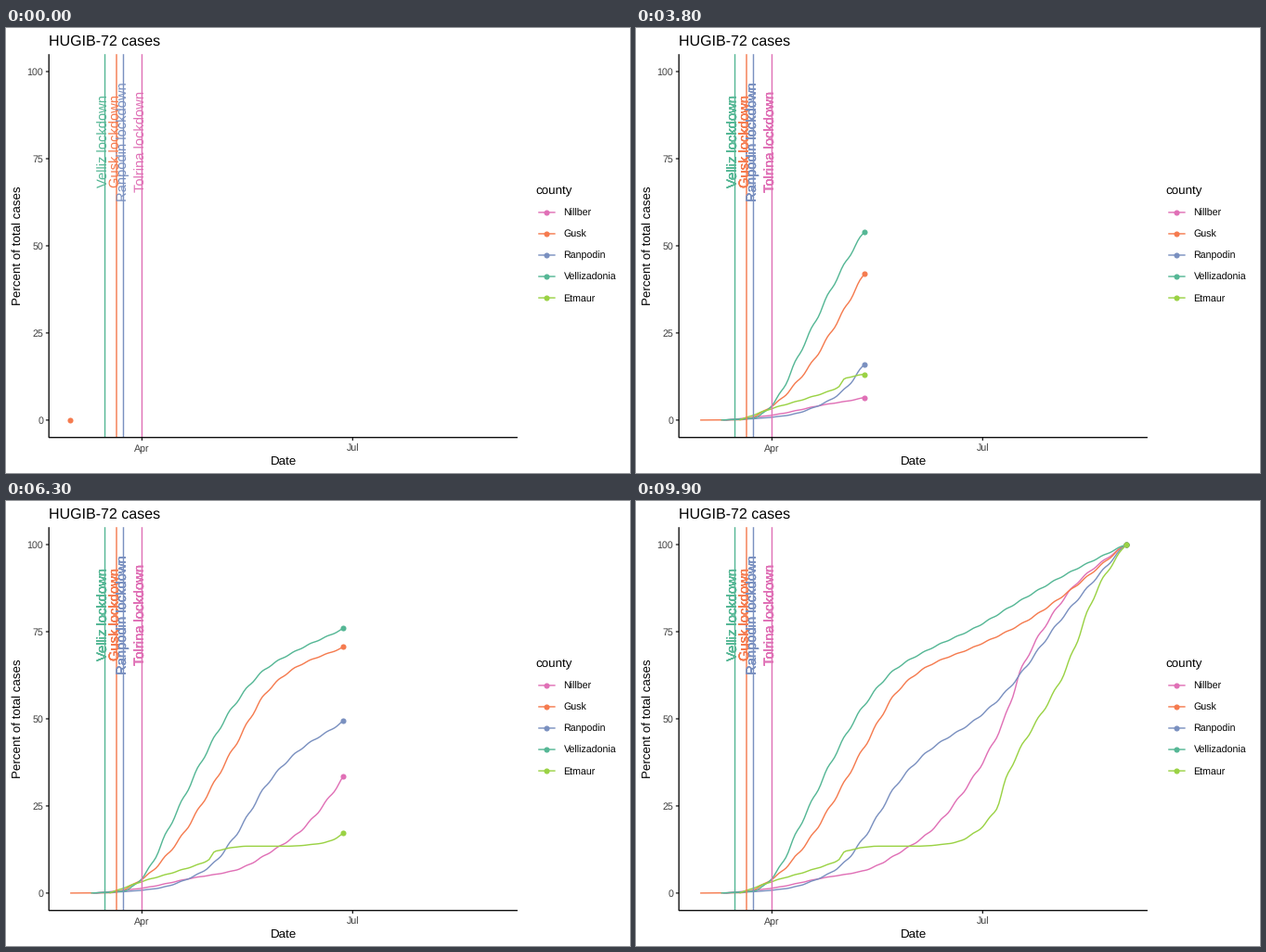
Recreate the animation shown at these times as a matplotlib script. Size 672 by 480 pixels, loop 10000 ms.

```python
import numpy as np
import matplotlib.pyplot as plt
from matplotlib.animation import FuncAnimation

plt.rcParams.update({
    "font.family": "Liberation Sans",
    "path.snap": False,
    "text.hinting": "none",
    "lines.solid_capstyle": "butt",
    "lines.solid_joinstyle": "round",
})

W, H, DPI = 672, 480, 96
FRAMES, DAYS = 100, 184
LEFT, RIGHT, TOP, BOTTOM = 46.2, 550.9, 28.2, 441.7
PX = 72 / DPI  # points per pixel
PAD = 0.05     # axis expansion on each side

PINK, ORANGE, BLUE = "#E070B6", "#F57B4F", "#7A90C0"
GREEN, LIME = "#55B795", "#9AD244"
TICK, GREY = "#242424", "#404040"


def sx(day):
    return LEFT + (RIGHT - LEFT) * (PAD + day / DAYS) / (1 + 2 * PAD)


def sy(pct):
    return BOTTOM - (BOTTOM - TOP) * (PAD + pct / 100) / (1 + 2 * PAD)


def monotone(t, keys):
    """Smooth curve through rising key points, without overshoot."""
    x, y = np.array(keys, float).T
    h = np.diff(x)
    d = np.diff(y) / h
    inner = 2 * d[:-1] * d[1:] / (d[:-1] + d[1:] + 1e-9)
    m = np.concatenate([d[:1], inner, d[-1:]])
    k = np.clip(np.searchsorted(x, t, side="right") - 1, 0, len(h) - 1)
    u = np.clip((t - x[k]) / h[k], 0, 1)
    return (y[k] + (y[k + 1] - y[k]) * u * u * (3 - 2 * u)
            + h[k] * u * (1 - u) * (m[k] * (1 - u) - m[k + 1] * u))


fig = plt.figure(figsize=(W / DPI, H / DPI), dpi=DPI, facecolor="white")
ax = fig.add_axes([0, 0, 1, 1])
ax.set_xlim(0, W)
ax.set_ylim(H, 0)
ax.axis("off")


def stroke(x, y, color="black", px=1.42, z=3, **kw):
    return ax.plot(x, y, color=color, lw=px * PX, zorder=z, **kw)[0]


def dot(x, y, color):
    return ax.plot(x, y, "o", color=color, ms=6.1 * PX, mew=0, zorder=4)[0]


def label(x, y, s, size, color="black", ha="left", angle=0, z=8):
    return ax.text(x, y, s, fontsize=size, color=color, ha=ha, va="baseline",
                   rotation=angle, rotation_mode="anchor", zorder=z)


class Series:
    """Cumulative share of one county, from (day, percent) keys."""

    def __init__(self, name, color, *keys):
        self.name, self.color, self.start = name, color, keys[0][0]
        days = np.arange(self.start, DAYS + 1)
        # reporting slows down once a week
        pct = monotone(days - 0.35 * np.sin(2 * np.pi * (days - 0.5) / 7), keys)
        self.x, self.y = sx(days), sy(100 * pct / pct[-1])
        self.line = stroke([], [], color)
        self.head = dot([], [], color)

    def show(self, day):
        n = max(0, day - self.start + 1)
        x, y = self.x[:n], self.y[:n]
        self.line.set_data(x, y)
        self.head.set_data(x[-1:], y[-1:])


series = [
    Series("Nillber", PINK, (11, 0), (31, 1.4), (52, 4.2), (71, 6.5),
           (89, 12.8), (99, 17.5), (118, 33.2), (131, 49.2), (139, 64.5),
           (151, 78.6), (163, 89), (184, 100)),
    Series("Gusk", ORANGE, (0, 0), (18, .1), (31, 4), (45, 13.5), (58, 26.8),
           (71, 42), (86, 58.4), (99, 65.2), (118, 70.4), (139, 77.2),
           (157, 85.3), (184, 100)),
    Series("Ranpodin", BLUE, (10, 0), (23, .4), (38, 1.4), (52, 4.4), (61, 8),
           (71, 16.1), (86, 32), (99, 40.9), (118, 49.2), (131, 56.9),
           (157, 79.3), (184, 100)),
    Series("Vellizadonia", GREEN, (9, 0), (23, .6), (31, 4.3), (45, 21.9),
           (58, 39.3), (71, 54), (84, 64), (99, 69.9), (118, 75.8),
           (139, 84.1), (157, 91), (184, 100)),
    Series("Etmaur", LIME, (17, 0), (31, 3.3), (47, 6.4), (60, 9.6),
           (63, 12), (77, 13.4), (93, 13.4), (109, 14.3), (118, 17),
           (127, 23.2), (134, 35.7), (157, 62.7), (172, 87.5), (184, 100)),
]

# Lockdown lines; each label is stacked once per county already reporting.
stacks = []
for day, place, color in ((15, "Velliz", GREEN), (20, "Gusk", ORANGE),
                          (23, "Ranpodin", BLUE), (31, "Tolrina", PINK)):
    x = sx(day)
    stroke([x, x], [TOP, BOTTOM], color, z=5)
    stacks.append([label(x + 3.6, sy(80), place + " lockdown", 11.04, color,
                         "center", 90, z=6) for _ in series])

# Axes and titles
stroke([LEFT, LEFT, RIGHT], [TOP, BOTTOM, BOTTOM], px=1.29, z=7,
       solid_joinstyle="miter")
for pct in range(0, 101, 25):
    y = sy(pct)
    stroke([LEFT - 3.33, LEFT], [y, y], TICK, 1.29, z=6.5)
    label(LEFT - 6, y + 3.84, str(pct), 8, GREY, "right")
for day, month in ((31, "Apr"), (122, "Jul")):
    x = sx(day)
    stroke([x, x], [BOTTOM, BOTTOM + 3.33], TICK, 1.29, z=6.5)
    label(x, 456.6, month, 8, GREY, "center")
label(LEFT, 18.7, "HUGIB-72 cases", 12)
label((LEFT + RIGHT) / 2, 471.6, "Date", 10, ha="center")
label(16.3, (TOP + BOTTOM) / 2, "Percent of total cases", 10, ha="center", angle=90)

# Legend
label(570.9, 179, "county", 10)
for k, s in enumerate(series):
    y = 198.9 + 23.04 * k
    stroke([573.2, 591.6], [y, y], s.color)
    dot([582.4], [y], s.color)
    label(600.6, y + 4.2, s.name, 8)


def draw(i):
    day = -(-i * DAYS // (FRAMES - 1))  # rounded up to whole days
    for s in series:
        s.show(day)
    active = sum(s.start <= day for s in series)
    for stack in stacks:
        for k, t in enumerate(stack):
            t.set_visible(k < active)
    return []


anim = FuncAnimation(fig, draw, frames=FRAMES, init_func=lambda: draw(0),
                     interval=100, repeat=True, repeat_delay=0)
plt.show()
```
